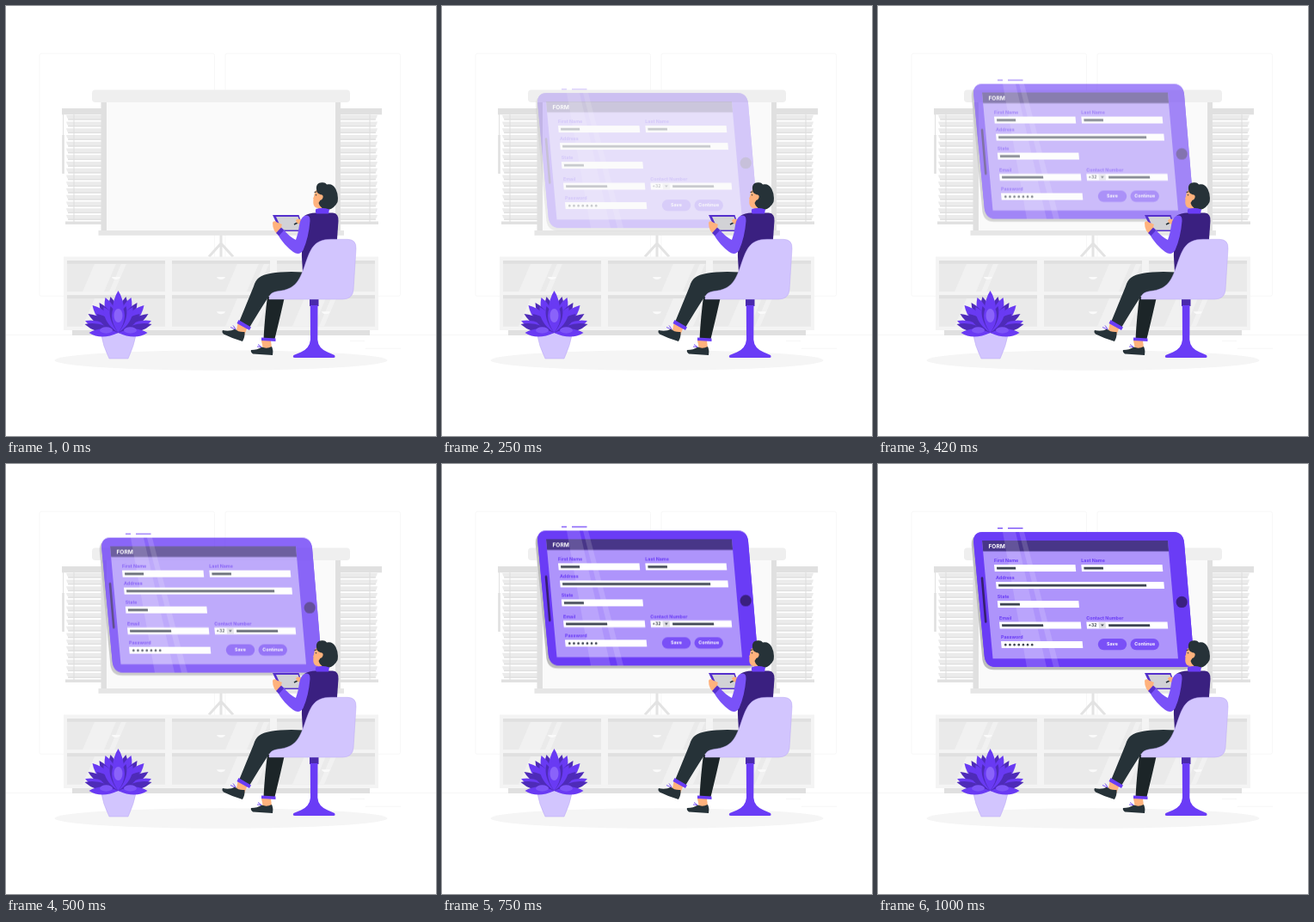
An HTML page for the animation above (1.04 s loop, 500 by 500 pixels).

```html
<!DOCTYPE html>
<html lang="en">
<head>
<meta charset="utf-8">
<title>Form on a tablet</title>
<style>
html, body { margin: 0; width: 100%; height: 100%; overflow: hidden; background: #fff; }
svg { display: block; width: 100vw; height: 100vh; }
text { font-family: Inter, "Open Sans", sans-serif; font-weight: 700; font-size: 5.35px; }
</style>
</head>
<body>
<svg viewBox="0 0 500 500">
  <g id="room">
    <g fill="#fff" stroke="#f5f5f5" stroke-width=".8">
      <rect x="39" y="55.3" width="203.5" height="282" rx="2"/>
      <rect x="255" y="55.3" width="203.5" height="282" rx="2"/>
    </g>
    <path d="M0 382.5H500M400 389.5H417M418 398.3H459" stroke="#ececec" stroke-width=".5"/>
    <g id="blinds"></g>
    <path d="M66.5 126V150" stroke="#e0e0e0"/>
    <path d="M66.5 150V195" stroke="#e0e0e0" stroke-width="2.6"/>
    <path d="M250 266V292M250 276L236 291.5M250 276L264 291.5" stroke="#e3e3e3" stroke-width="3" fill="none"/>
    <rect x="110.5" y="110" width="278.5" height="152" fill="#e0e0e0"/>
    <rect x="117" y="110" width="266" height="152" fill="#fafafa"/>
    <rect x="107.500" y="261" width="285.500" height="5.800" fill="#e6e6e6"/>
    <rect x="100" y="97.500" width="300" height="14.500" rx="4" fill="#efefef"/>
    <rect x="77" y="376" width="346" height="7" fill="#e0e0e0"/>
    <rect x="67" y="291.500" width="366" height="85.500" fill="#f4f4f4"/>
    <g id="drawers"></g>
    <ellipse cx="250" cy="412" rx="193.5" ry="11.700" fill="#f5f5f5"/>
  </g>

  <g id="tablet">
    <path d="M139 74.700h6M151 74.700h17.500" stroke="#6a3cf6" stroke-width="1.300"/>
    <path id="body" d="M122 79H343Q354.500 79 356 91L367.200 224Q368 236 357 236H137Q125.500 236 123.800 224L111.200 91Q110.500 79 122 79Z" fill="#bdbdbd" transform="translate(-2.400 3.300)"/>
    <use href="#front"/>
    <path id="front" d="M122 79H343Q354.500 79 356 91L367.200 224Q368 236 357 236H137Q125.500 236 123.800 224L111.200 91Q110.500 79 122 79Z" fill="#6a3cf6"/>
    <path d="M121 89H337L349 226.300H133.500Z" fill="#ae94fb"/>
    <path d="M121 89H337L338.100 101.500H122.200Z" fill="#483688"/>
    <path d="M145 79H160L196 236H173Z" fill="#fff" opacity=".15"/>
    <path d="M164 79H170L211 236H204Z" fill="#fff" opacity=".15"/>
    <path d="M121 132.500L125.300 183.500" stroke="#35206f" stroke-width="2.600" stroke-linecap="round"/>
    <circle cx="353.200" cy="160.500" r="6.600" fill="#3a2080"/>
    <text x="128.500" y="98" fill="#fff" style="font-size:6.600px">FORM</text>
    <g id="form"></g>
  </g>

  <g id="plant">
    <g id="petals"></g>
    <path d="M110.500 380.500H151.500Q149 395 142 410H120Q112.500 395 110.500 380.500Z" fill="#d2c5fe" stroke="#b9a6f3" stroke-width=".5"/>
    <g id="lowPetals"></g>
  </g>

  <g id="person">
    <path d="M353 340H363.500V349H353Z" fill="#4a2aac"/>
    <path d="M353.800 348H362.500L362.300 388Q363 398 374 402.500L382 406Q383.500 409 381 409H336Q332.500 409 334.500 406L343 402.500Q353 398 354 388Z" fill="#6a3cf6"/>

    <path d="M297 389L308 389L309 398L299 399Z" fill="#ffb27d"/>
    <path d="M304 338Q301 360 299.500 387H312.500Q318 365 324 338Z" fill="#1c2528"/>
    <path d="M297 385.500L313.500 386.500V390L297 389Z" fill="#6a3cf6"/>
    <path d="M285 400Q292 400 297.500 396.500Q303 399 309 396Q311 400 310 406L287 404.500Q284 402 285 400Z" fill="#263238"/>
    <path d="M292 396l5 .5M293 393.500l4 3" stroke="#7b55f8" stroke-width="1" fill="none"/>

    <path d="M270 367L281 373L277 383L268 377Z" fill="#ffb27d"/>
    <path d="M252 377Q260 379 266.500 375.500Q270 379.500 277.500 379Q278 385 275 390Q264 387 253 381.500Q250.500 379 252 377Z" fill="#263238"/>
    <path d="M261 373.500l6 2.500M264 371.500l3 4" stroke="#7b55f8" stroke-width="1" fill="none"/>
    <path d="M346 309.500Q306 307.500 294 316Q290 319 288 326L271 367.500L283 374Q293 357 306 337Q326 333 346 332Z" fill="#263238"/>
    <path d="M270.500 365L285 373.500L283 377L268.500 369Z" fill="#6a3cf6"/>

    <path d="M347 244Q352 240.500 360 240.500H380Q387 241 386.500 250L384 285L370 310H345Q343 290 344.500 270Z" fill="#3a2080"/>
    <path d="M306 341Q305 333 317 331.500C336 329.500 341 320 347 303C354 283 357 271.500 378 271.300H397Q407.500 271.500 407 282L404 330Q403 341 391 341Z" fill="#d2c5fe" stroke="#baa8f2" stroke-width=".5"/>

    <path d="M310 243H340.500L347 262H319Z" fill="#5530cc"/>
    <path d="M314 245H339.500L345 260.500H321Z" fill="#d2d2d6"/>
    <path d="M335 254L341 251" stroke="#263238" stroke-width="1.600"/>
    <path d="M337 249Q340 246 344 249L343 255L338 252Z" fill="#ffb27d"/>
    <path d="M310 252Q311 249 315 251.500L321 254Q319 257 322 261L317 266Q310 262 310 252Z" fill="#ffb27d"/>
    <path d="M347 244Q354 241.500 353.500 250Q352 269 345.500 284Q341 291 334 286Q323 278 315.500 265L321.500 258.500Q329 268 337 272Q340 264 341 255Q342 247 347 244Z" fill="#7a52f8"/>
    <path d="M314 264L320 257.500L323 261L317.500 267Z" fill="#5530cc"/>

    <path d="M359.500 215Q357 224 357.300 229Q357.500 234.500 363 235L362 240H374V220L365 212Z" fill="#ffb27d"/>
    <path d="M359.500 219.500L357 224L359.500 225Z" fill="#ffb27d"/>
    <path d="M361 213Q360 206 367 205.300Q371 204.500 373 207.500Q380 206 383.500 213Q387 220 385.500 228Q382 235 375 237Q365 236 363.500 229Q367 226 365.500 219Q361 218 361 213Z" fill="#263238"/>
    <ellipse cx="366" cy="222.500" rx="2.500" ry="3.200" fill="#ffb27d" transform="rotate(20 366 222.500)"/>
    <path d="M358.500 216.600l3-.8" stroke="#263238" stroke-width="1"/>
    <circle cx="360.500" cy="219.800" r=".7" fill="#263238"/>
    <path d="M360.500 236Q368 234 376 236.500L375 241.500H361Q359 239 360.500 236Z" fill="#6a3cf6"/>
  </g>
</svg>
<script>
const $ = id => document.getElementById(id);
const rect = (x, y, w, h, fill) => `<rect x="${x}" y="${y}" width="${w}" height="${h}" fill="${fill}"/>`;
const path = (d, fill) => `<path d="${d}" fill="${fill}"/>`;

// Window blinds, mirrored about the middle of the stage
let side = rect(65, 119, 70, 7.3, '#e0e0e0');
for (let i = 0; i < 16; i++) {
  const y = 126.8 + i * 7.75;
  side += path(`M70 ${y}H130V${y + 5.6}H73.500Q70.500 ${y + 4} 70 ${y}Z`, '#ebebeb');
  side += rect(72, y + 4.4, 58, 1.4, '#e0e0e0');
}
side += rect(78.5, 126, 1, 125, '#dedede') + rect(69, 250.5, 60, 3.4, '#e0e0e0');
$('blinds').innerHTML = side + `<g transform="translate(502 0) scale(-1 1)">${side}</g>`;

let drawers = '';
for (const y of [296, 336.3]) for (const x of [71, 193, 315]) {
  drawers += rect(x, y, 114, 36.3, '#eaeaea');
  const shine = x === 193 ? 62 : 18;
  for (const [dx, w] of [[shine, 25], [shine + 31, 6]])
    drawers += path(`M${x + dx + 14} ${y + 3.5}h${w}l-14 32.800h-${w}Z`, '#f1f1f1');
  drawers += rect(x, y, 114, 3.8, '#e0e0e0');
  drawers += path(`M${x + 52} ${y + 19}h10q-1 3 -5 3t-5 -3Z`, '#fafafa');
}
$('drawers').innerHTML = drawers;

// Form contents, leaning with the tablet
const LEAN = 0.09;
const slant = (x, y, w, h, fill) => path(`M${x} ${y}h${w}l${h * LEAN} ${h}h${-w}Z`, fill);
const label = (x, y, s, fill = '#6a3cf6', more = '') => `<text x="${x}" y="${y}" fill="${fill}" ${more}>${s}</text>`;
const INK = '#3b4250';
const fields = [
  ['First Name', 135, 117, 94.5, 22],
  ['Last Name', 236.3, 117, 94.3, 22.5],
  ['Address', 137, 137, 195.3, 172],
  ['State', 138.8, 159, 94.5, 23],
  ['Email', 141, 183.5, 94.7, 48],
  ['Contact Number', 242.3, 183.5, 94.2, 0],
  ['Password', 143, 206, 94.6, 0]
];
let form = '';
for (const [name, x, y, w, ink] of fields) {
  form += label(x, y - 2.5, name) + slant(x, y, w, 8, '#fff');
  if (ink) form += slant(x + 3, y + 2.7, ink, 2.8, INK);
}
form += label(244.6, 189.3, '+32', INK, 'style="font-size:5px"');
form += slant(256.5, 184.3, 8, 6.4, '#dedee3') + path('M259 186.500h3.800l-1.900 2.400Z', INK);
form += slant(268, 186.2, 48, 2.8, INK);
for (let i = 0; i < 7; i++) form += `<circle cx="${148.3 + i * 5.15}" cy="210.200" r="1.300" fill="${INK}"/>`;
for (const [s, x] of [['Save', 272.5], ['Continue', 310.2]])
  form += `<rect x="${x - 16.7}" y="203" width="33.400" height="13.200" rx="6.600" fill="#7a50f7"/>`
    + label(x, 211.5, s, '#fff', 'text-anchor="middle"');
$('form').innerHTML = form;

// Plant: petals grow from one root, each side mirrored
const petal = (dx, dy, w, fill) => {
  const len = Math.hypot(dx, dy), nx = -dy / len * w, ny = dx / len * w;
  const cx = 130.5 + dx * .58, cy = 380 + dy * .58;
  return path(`M130.500 380Q${cx + nx} ${cy + ny} ${130.5 + dx} ${380 + dy}Q${cx - nx} ${cy - ny} 130.500 380Z`, fill);
};
const pair = (dx, dy, w, fill) => petal(-dx, dy, w, fill) + petal(dx, dy, w, fill);
const P = '#693af3', D = '#4e2bb8';
$('petals').innerHTML =
  pair(9, -42, 11, D) + petal(0, -49, 13, P) + pair(15, -41, 12, P) + pair(22, -35, 10, D)
  + pair(30, -32, 12, P) + pair(35, -22, 9, D) + pair(38.5, -14, 10, P)
  + pair(25, -22, 9, D) + pair(17, -30, 10, P) + pair(9, -31, 8, D) + petal(0, -37, 15, P)
  + '<ellipse cx="130.500" cy="360" rx="5" ry="8" fill="#8a63fa"/>';
$('lowPetals').innerHTML = pair(39, -10, 9, D) + pair(34, 0, 9, P)
  + [116.5, 144.5].map(x => `<ellipse cx="${x}" cy="377" rx="7.500" ry="3.700" fill="#7d54f7"/>`).join('');

// Cubic bezier (.36, -.01, .5, 1.38) with overshoot
const bez = (s, a, b) => 3 * a * s * (1 - s) ** 2 + 3 * b * s * s * (1 - s) + s ** 3;
function ease(x) {
  if (x >= 1) return 1;
  let lo = 0, hi = 1;
  for (let i = 0; i < 30; i++) {
    const mid = (lo + hi) / 2;
    if (bez(mid, .36, .5) < x) lo = mid; else hi = mid;
  }
  return bez(lo, -.01, 1.38);
}

// Held poses, 24 steps per second
const LOOP = 1040, STEP = 41.6, poses = [];
for (let k = 0; k <= 25; k++) {
  const p = ease(k / 24 + .02);
  poses.push({
    offset: k === 25 ? 1 : Math.max(0, (k * STEP - 4) / LOOP),
    transform: `translateY(${30 * (1 - p)}px)`,
    opacity: Math.min(1, Math.max(0, p)),
    easing: 'steps(1, end)'
  });
}
$('tablet').animate(poses, { duration: LOOP, iterations: Infinity });
</script>
</body>
</html>
```
